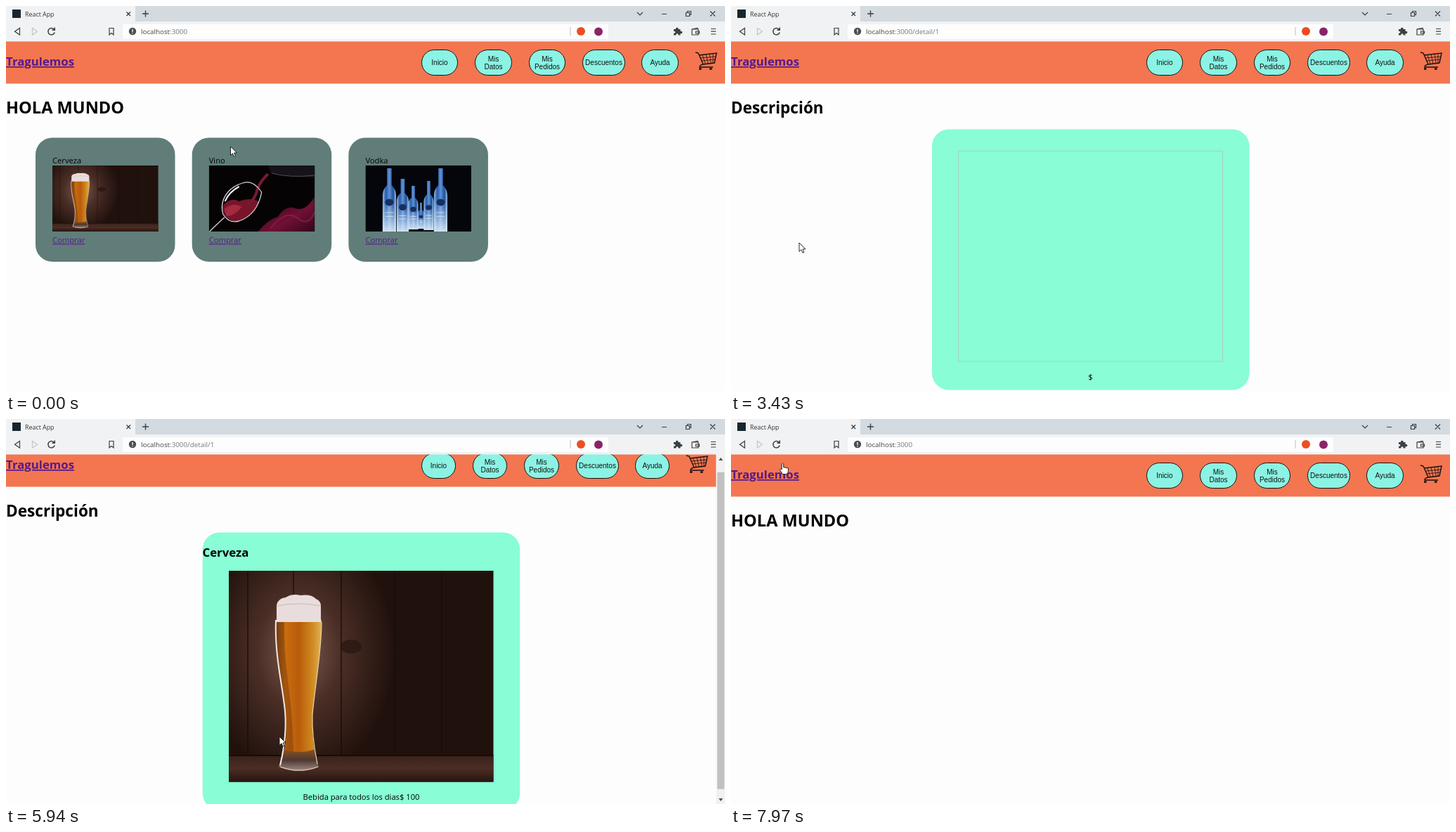
Animation, 1023 px wide and 548 px high, one loop 8000 ms. Source, as an HTML page:

```html
<!DOCTYPE html>
<html lang="es">
<head>
<meta charset="utf-8">
<title>React App</title>
<style>
html, body { margin: 0; width: 100%; height: 100%; overflow: hidden; background: #fdfdfd }
svg { display: block; font-family: "Open Sans", "Noto Sans", sans-serif }
.h1 { font-weight: 700; font-size: 22.6px }
.h2 { font-weight: 700; font-size: 16.8px }
.p { font-size: 11.2px }
.link { fill: #551a8b; text-decoration: underline }
.btn text { font: 10px "Liberation Sans", Arial, sans-serif; text-anchor: middle; fill: #111 }
.btn rect { fill: #8bf3e4; stroke: #111 }
.ui { fill: none; stroke: #3c3f43; stroke-width: 1.2 }
</style>
</head>
<body>
<svg width="1023" height="548" viewBox="0 0 1023 548">
  <defs>
    <radialGradient id="glow" gradientUnits="userSpaceOnUse" cx="100" cy="115" r="180" gradientTransform="matrix(.75 0 0 1 25 0)">
      <stop offset="0" stop-color="#7d5c50"/><stop offset=".45" stop-color="#4a2e26"/><stop offset="1" stop-color="#21110d"/>
    </radialGradient>
    <linearGradient id="table" x2="0" y2="1">
      <stop offset="0" stop-color="#38211a"/><stop offset=".5" stop-color="#4b2e25"/><stop offset="1" stop-color="#28140f"/>
    </linearGradient>
    <linearGradient id="ale">
      <stop offset="0" stop-color="#8a4a14"/><stop offset=".2" stop-color="#c96d10"/><stop offset=".5" stop-color="#b95c0b"/>
      <stop offset=".8" stop-color="#d08a20"/><stop offset="1" stop-color="#e0b458"/>
    </linearGradient>
    <linearGradient id="base" x2="0" y2="1">
      <stop offset="0" stop-color="#8a5220"/><stop offset=".5" stop-color="#4d3832"/><stop offset="1" stop-color="#a08c84"/>
    </linearGradient>
    <linearGradient id="blue">
      <stop offset="0" stop-color="#8fb8e6"/><stop offset=".25" stop-color="#285cab"/><stop offset=".5" stop-color="#5d92d4"/>
      <stop offset=".8" stop-color="#20509b"/><stop offset="1" stop-color="#a4c8ee"/>
    </linearGradient>
    <linearGradient id="shine" x2="0" y2="1">
      <stop offset=".5" stop-color="#dff0ff" stop-opacity="0"/><stop offset="1" stop-color="#e8f5ff" stop-opacity=".85"/>
    </linearGradient>
    <linearGradient id="splash" x2="1" y2="1">
      <stop offset="0" stop-color="#2a0413"/><stop offset=".6" stop-color="#701035"/><stop offset="1" stop-color="#31061a"/>
    </linearGradient>
    <clipPath id="photo"><path d="M0 0H150.5V94H0Z"/></clipPath>

    <g id="beer">
      <path fill="url(#glow)" d="M0 0H376.5V300.5H0Z"/>
      <path d="M27 0V262M92 0V40M160 0V262M236 0V262M303 0V262" stroke="#180b08" stroke-width="2" opacity=".65"/>
      <ellipse cx="174" cy="108" rx="15" ry="10" fill="#28140f" opacity=".7"/>
      <path fill="url(#table)" d="M0 262H376.5V300.5H0Z"/>
      <path d="M0 263H376" stroke="#170b08" stroke-width="2"/>
      <path fill="url(#ale)" d="M68 70H132C132 115 123 160 119 205Q118 235 123 264H78Q84 235 80 200C76 160 66 120 68 70Z"/>
      <path fill="#5c2a0b" opacity=".35" d="M68 73H79C77 130 91 180 92 262H80Q84 235 80 200C76 160 66 120 68 73Z"/>
      <path fill="url(#base)" d="M78 254Q100 262 122 254L128 279Q100 291 71 279Z"/>
      <path fill="#e9dcdc" d="M68 73V49Q70 39 81 38Q90 32 102 35Q117 33 124 40Q131 43 131 50V73Z"/>
      <path fill="none" stroke="#c9b8b8" d="M68 50Q100 44 131 50"/>
      <path fill="none" stroke="#f3e9df" stroke-width="2" d="M67 70C65 120 76 160 80 200Q83 235 73 277"/>
      <path fill="none" stroke="#e8d2a0" stroke-width="1.2" d="M132 73C132 115 123 160 119 205Q118 235 126 275M73 279Q100 289 127 279"/>
    </g>
    <g id="wine" clip-path="url(#photo)">
      <path fill="#060305" d="M0 0H151V94H0Z"/>
      <path fill="#17131a" d="M84 0H151V17Q112 16 88 10Z"/>
      <path fill="none" stroke="#55505a" d="M89 11Q116 18 150 14"/>
      <path fill="url(#splash)" d="M70 94Q84 77 98 73Q108 58 120 60Q136 68 150 45V94Z"/>
      <path fill="none" stroke="#8c244b" stroke-width="2" opacity=".7" d="M88 89Q110 62 126 75T151 65"/>
      <path fill="#78152a" d="M19 59Q29 44 43 51Q57 45 71 51Q62 76 40 79Q22 80 19 59Z"/>
      <path fill="#a42a3f" d="M22 62Q35 51 47 59Q35 73 25 72Z"/>
      <path fill="none" stroke="#751b31" stroke-width="4" d="M84 12Q72 24 69 34Q66 48 55 56"/>
      <path fill="none" stroke="#d9d6db" stroke-width="1.3" d="M48 25C25 32 15 51 20 69Q28 83 43 79Q69 70 75 38M48 25Q63 20 75 38M22 74Q14 81 1 94"/>
      <path fill="none" stroke="#fff" stroke-width="2" d="M43 30Q28 38 23 51"/>
    </g>
    <g id="vodka" clip-path="url(#photo)"><path fill="#04060c" d="M0 0H151V94H0Z"/></g>

    <g id="cart" fill="none" stroke="#1a1010">
      <path stroke-width="1.4" d="M0 2L4 3 11 19Q6 20 6 23H25M5 6L30 3 27 17 11 19"/>
      <path stroke-width=".8" d="M7 10L29 8M9 14L28 12M10 6L14 18M15 5L18 18M20 4L22 17M25 4L25 17"/>
      <path stroke-width="2.6" d="M5 25.5H8.5M20 25.5H23.5"/>
    </g>
    <path id="arrow" fill="#fff" stroke="#111" stroke-width=".9" d="M0 0V12.5L3 9.8 5 14.4 7 13.5 5.1 9H9Z"/>
    <path id="hand" fill="#fff" stroke="#111" stroke-width=".9" d="M-1.2 1Q0-.8 1.2 1V6L8 7.5V11Q8 14 6 16H0L-4 10Q-4 8-1.2 9Z"/>
  </defs>

  <path fill="#fdfdfd" d="M0 0H1023V548H0Z"/>
  <g id="page"></g>

  <g id="scrollbar">
    <path fill="#f1f1f1" d="M1010.5 50H1023V548H1010.5Z"/>
    <rect id="thumb" x="1012" width="10" height="451" fill="#c1c1c1"/>
    <path fill="#505050" d="M1014 59L1017 55 1020 59ZM1014 540L1017 544 1020 540Z"/>
  </g>

  <g id="browser">
    <path fill="#d3dae0" d="M0 0H1023V22H0Z"/>
    <path fill="#f0f2f3" d="M0 0H184V22H1023V50.500H0Z"/>
    <rect x="166" y="26" width="691" height="21" rx="2" fill="#fdfdfd"/>
    <rect x="9" y="5" width="12" height="12" fill="#17262e"/>
    <text x="27" y="14.500" font-size="8.9" fill="#333">React App</text>
    <text x="192" y="39.700" font-size="9.8" fill="#444">localhost<tspan id="path" fill="#74777b"></tspan></text>
    <g class="ui">
      <path d="M171.500 8.500L177 14M177 8.500L171.500 14M194 11H203M198.500 6.500V15.500" stroke-width="1.400"/>
      <path d="M898 9L902 13 906 9M933 11.500H940M967.500 9.500H972.500V14.500H967.500ZM969.500 9V7.500H974.500V12.500H973M1002 7.500L1009 14.500M1009 7.500L1002 14.500"/>
      <path d="M19.500 31.500V41L12.500 36.200Z"/>
      <path d="M37.500 31.500V41L44.500 36.200Z" stroke="#c4c7ca"/>
      <path d="M68.500 33.500A4.700 4.700 0 1 0 69.200 37.500M69.300 30.500V34.300H65.500" stroke-width="1.500"/>
      <path d="M147 31.500H153V41L150 38.500 147 41Z"/>
      <path d="M803 30V42" stroke="#c6c8cb"/>
      <path d="M976 33H985V41H976V33L984 31.500V33M981.500 36H986.500V39H981.500Z"/>
      <path d="M1003 32.500H1010M1003 36.200H1010M1003 40H1010"/>
    </g>
    <circle cx="180" cy="36" r="5.200" fill="#4b4e52"/>
    <path d="M180 33V37M180 38V39.300" stroke="#fff" stroke-width="1.300"/>
    <circle cx="818" cy="36" r="6" fill="#ee4d24"/>
    <circle cx="843" cy="36.500" r="6" fill="#8a2468"/>
    <path fill="#3c3f43" d="M950 33H953A1.800 1.800 0 1 1 956.500 33H959.500V36A1.800 1.800 0 1 1 959.500 39V41.500H956.500A1.600 1.600 0 1 0 953.500 41.500H950V38.500A1.500 1.500 0 1 0 950 36Z"/>
  </g>
  <use id="cursor"/>
</svg>
<script>
const $ = id => document.getElementById(id);
const LOOP = 8000, MAX_SCROLL = 22.5;
const DETAIL = 3365, LOADED = 5470, HOME = 7700;

const bottle = ([x, top, w, bottom]) => {
  const h = bottom - top, n = w * .17, y = k => top + h * k;
  const shape = `M${x - n} ${top}H${x + n}V${y(.27)}Q${x + w / 2} ${y(.33)} ${x + w / 2} ${y(.43)}V${bottom}H${x - w / 2}V${y(.43)}Q${x - w / 2} ${y(.33)} ${x - n} ${y(.27)}Z`;
  return `<path fill="url(#blue)" d="${shape}"/><path fill="url(#shine)" d="${shape}"/>
    <ellipse cx="${x}" cy="${y(.54)}" rx="${w * .32}" ry="${w * .26}" fill="#172f60"/>
    <path d="M${x - w * .3} ${y(.7)}H${x + w * .3}M${x - w * .3} ${y(.76)}H${x + w * .3}" stroke="#d9e9fa" stroke-width=".8"/>`;
};
$('vodka').innerHTML += [[34, 4, 19, 94], [53, 19, 17, 94], [107, 4, 19, 94], [90, 22, 14, 92], [68, 29, 14, 91], [79, 53, 9, 90]].map(bottle).join('');

const labels = ['Inicio', 'Mis Datos', 'Mis Pedidos', 'Descuentos', 'Ayuda'];
function header(width, spans, cartX) {
  const buttons = labels.map((label, i) => {
    const [x, w] = spans[i], words = label.split(' ');
    const lines = words.map((word, k) =>
      `<text x="${x + w / 2}" y="${words.length > 1 ? 78.5 + 11 * k : 84.3}">${word}</text>`);
    return `<rect x="${x + .5}" y="62.5" width="${w - 1}" height="36" rx="18"/>` + lines.join('');
  });
  return `<path fill="#f37650" d="M0 50H${width}V110.500H0Z"/>
    <text class="h2 link" x="0" y="85">Tragulemos</text>
    <g class="btn">${buttons.join('')}</g><use href="#cart" x="${cartX}" y="64"/>`;
}
const wide = header(1023, [[591, 52], [667, 53], [744, 52], [820, 61], [904, 53]], 981);
const narrow = header(1010.5, [[591, 49], [664, 49], [737, 50], [811, 61], [895, 49]], 968);

const title = (text, size) => `<text class="h1" x="0" y="152.500" style="font-size:${size}px">${text}</text>`;
const panel = (x, h) => `<rect x="${x}" y="175.500" width="451.500" height="${h}" rx="24" fill="#88fdd6"/>`;
const product = (name, photo, x) => `<rect x="${x}" y="187.500" width="198.500" height="176.500" rx="24" fill="#607d79"/>
  <text class="p" x="${x + 24}" y="224">${name}</text>
  <use href="#${photo}" transform="translate(${x + 24} 227)${photo === 'beer' ? 'scale(.4 .3128)' : ''}"/>
  <text class="p link" x="${x + 24}" y="337.300">Comprar</text>`;

const homeEmpty = wide + title('HOLA MUNDO', 23.6);
const scenes = {
  home: homeEmpty + product('Cerveza', 'beer', 42) + product('Vino', 'wine', 264.700) + product('Vodka', 'vodka', 487.400),
  homeEmpty,
  detailEmpty: wide + title('Descripción', 22.6) + panel(286, 371) +
    `<path fill="none" stroke="#a9cdbf" d="M323.500 206.500H699.500V506H323.500Z"/>
     <text class="p" x="511.500" y="531.500" text-anchor="middle">$</text>`,
  detail: narrow + title('Descripción', 22.6) + panel(279.700, 395) +
    `<text class="h2" x="279.500" y="209.700">Cerveza</text><use href="#beer" x="317" y="230"/>
     <text class="p" x="505.500" y="555.500" text-anchor="middle">Bebida para todos los dias$ 100</text>`
};

// Pointer stops: time, x, y
const stops = [
  [0, 319.500, 200], [350, 325, 215], [830, 345, 270], [1630, 402, 352], [2130, 408, 389],
  [2450, 345, 412], [2800, 200, 390], [3200, 97, 337], [3800, 97, 337], [4300, 215, 385],
  [5000, 402, 448], [5100, 402, 448], [5300, 392, 452], [5940, 389, 452], [6220, 375, 445],
  [6670, 123, 329], [6900, 112, 260], [7400, 74, 62], [7940, 74, 62], [8000, 73, 63]
];
const clamp = v => Math.min(1, Math.max(0, v));
const smooth = v => v * v * (3 - 2 * v);

function pointer(t) {
  const i = stops.findIndex(s => s[0] > t);
  const [t0, x0, y0] = stops[i - 1], [t1, x1, y1] = stops[i];
  const k = smooth((t - t0) / (t1 - t0));
  return [x0 + (x1 - x0) * k, y0 + (y1 - y0) * k];
}

let shown;
function draw(now) {
  const t = now % LOOP;
  const scene = t < DETAIL ? 'home' : t < LOADED ? 'detailEmpty' : t < HOME ? 'detail' : 'homeEmpty';
  if (scene !== shown) {
    $('page').innerHTML = scenes[scene];
    $('path').textContent = ':3000' + (scene.startsWith('detail') ? '/detail/1' : '');
    $('scrollbar').style.display = scene === 'detail' ? '' : 'none';
    shown = scene;
  }
  const scroll = scene === 'detail' ? MAX_SCROLL * smooth(clamp((t - 5870) / 122)) : 0;
  $('page').setAttribute('transform', `translate(0 ${-scroll})`);
  $('thumb').setAttribute('y', 63 + scroll * .91);

  const [x, y] = pointer(t);
  const overLink = t > 3130 && t < DETAIL || t > 7340;
  $('cursor').setAttribute('href', overLink ? '#hand' : '#arrow');
  $('cursor').setAttribute('transform', `translate(${x} ${y})`);
  requestAnimationFrame(draw);
}
requestAnimationFrame(draw);
</script>
</body>
</html>
```
